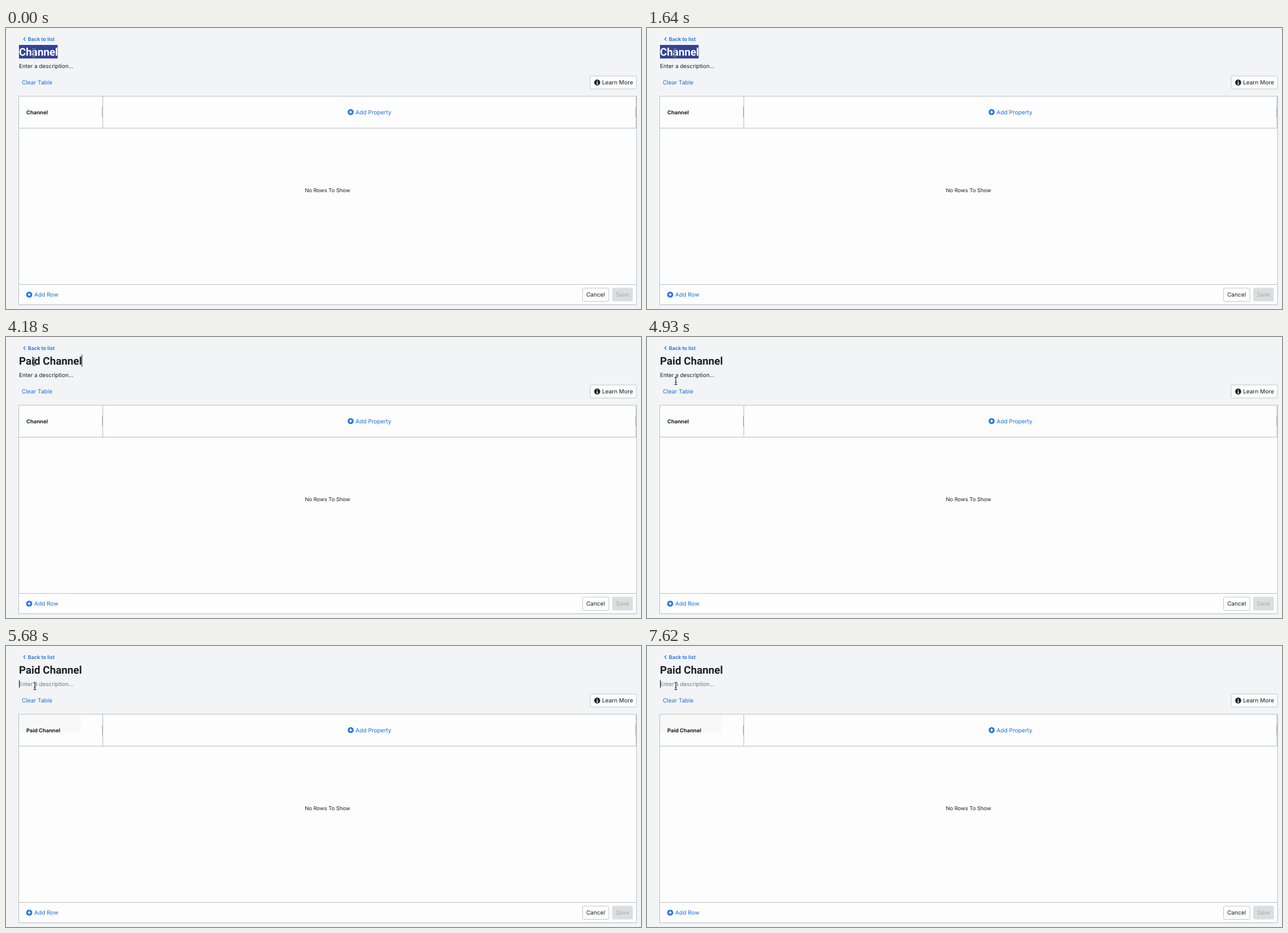
Write an HTML page that moves like this. It is 1125x498 px and loops after 8000 ms.

```html
<!DOCTYPE html>
<html lang="en">
<head>
<meta charset="utf-8">
<title>Table editor</title>
<style>
  html, body { margin: 0; width: 100%; height: 100%; overflow: hidden; background: #f3f4f6; }
  svg { display: block; width: 1125px; height: 498px; }
  text { font: 10.1px Inter, sans-serif; fill: #1d1f22; white-space: pre; text-rendering: geometricPrecision; }
  .link { fill: #1b6fe0; }
  .back { font-size: 9px; font-weight: 600; }
  .head { font-size: 9.4px; font-weight: 700; }
  .empty { font-size: 9.4px; text-anchor: middle; }
  #title { font: 600 18.8px Roboto, sans-serif; }
  .line { fill: none; stroke: #b9bbbf; }
  .button { fill: #fdfdfd; stroke: #c3c5c9; }
</style>
</head>
<body>
<svg viewBox="0 0 1125 498">
  <defs>
    <g id="plus">
      <circle r="5.3" fill="#1b6fe0"/>
      <path d="M-2.9 0H2.9M0-2.9V2.9" stroke="#fff" stroke-width="1.5"/>
    </g>
    <path id="beam" d="M-2.6-6.5Q0-6.5 0-4.8Q0-6.5 2.6-6.5M0-5V5M-2.6 6.5Q0 6.5 0 4.8Q0 6.5 2.6 6.5M-1.5 2H1.5" fill="none"/>
  </defs>

  <path d="M34.4 16.6L31.4 19.6L34.4 22.6" fill="none" stroke="#1b6fe0" stroke-width="1.3"/>
  <text class="link back" x="38.8" y="22.9">Back to list</text>

  <rect id="selection" x="23" y="30" width="68.5" height="24" fill="#32439b"/>
  <text id="title" x="23" y="48.9"></text>
  <rect id="titleCaret" y="31" width="1" height="22" fill="#1d1f22"/>

  <rect id="hover" x="23" y="60" width="1093" height="14" fill="#dcdddf"/>
  <text id="description" x="23" y="70.5" style="font-size:9.9px">Enter a description...</text>
  <rect id="descCaret" x="23" y="60" width="1" height="14" fill="#1d1f22"/>

  <text class="link" x="28" y="100.2">Clear Table</text>
  <rect class="button" x="1035" y="85" width="82" height="23" rx="2"/>
  <circle cx="1047.4" cy="96.5" r="5.3" fill="#1d1f22"/>
  <path d="M1047.4 93V94.4M1046.3 96H1047.6V99.3M1046 99.3H1049" fill="none" stroke="#fff" stroke-width="1.2"/>
  <text x="1056" y="100.2">Learn More</text>

  <rect x="22.5" y="121" width="1094.5" height="369.5" fill="#fdfdfd" class="panel"/>
  <rect id="tint" x="23" y="122" width="110" height="31" fill="#f8f8f8"/>
  <path class="line" d="M22.5 121H1117V490.5H22.5ZM22.5 177.5H1117M22.5 454.5H1117M171.5 121V177.5"/>
  <path class="line" d="M170.7 140V158M1116.4 121V177.5" style="stroke:#a3a6ab"/>
  <path class="line" d="M1115.8 140V158" style="stroke:#a3a6ab"/>
  <text id="heading" class="head" x="36" y="152.6"></text>
  <use href="#plus" x="610.6" y="149"/>
  <text class="link" x="619.3" y="152.7">Add Property</text>
  <text class="empty" x="569.5" y="291.1">No Rows To Show</text>

  <use href="#plus" x="41.1" y="472.5"/>
  <text class="link" x="50" y="476.3">Add Row</text>
  <rect class="button" x="1021.5" y="461" width="46.5" height="23.5" rx="2"/>
  <text x="1028" y="476.3">Cancel</text>
  <rect x="1074" y="460.5" width="36.5" height="24" rx="2" fill="#dcdddf"/>
  <text x="1080.6" y="476.3" style="fill:#a9abaf">Save</text>

  <g id="cursor">
    <use href="#beam" stroke="#f3f4f6" stroke-width="2.4" stroke-opacity=".75"/>
    <use href="#beam" stroke="#1d1f22" stroke-width="1.1"/>
  </g>
</svg>

<script>
const LOOP = 8000;
const byId = id => document.getElementById(id);
const show = (id, on) => byId(id).setAttribute('visibility', on ? 'visible' : 'hidden');

// Each step changes only the listed properties of the state before it.
const steps = [
  [0, { title: 'Channel', heading: 'Channel', selected: true, titleCaret: false,
        hover: false, focused: false, descCaret: false, cursor: [49.5, 44] }],
  [2090, { title: 'P', selected: false, titleCaret: true }],
  [2390, { title: 'Pa' }],
  [2540, { title: 'Pai' }],
  [2690, { title: 'Paid' }],
  [3140, { title: 'Paid ' }],
  [3440, { title: 'Paid C' }],
  [3590, { title: 'Paid Ch' }],
  [3740, { title: 'Paid Cha' }],
  [3890, { title: 'Paid Chan' }],
  [4030, { title: 'Paid Channe' }],
  [4180, { title: 'Paid Channel' }],
  [4480, { cursor: [50, 50] }],
  [4630, { cursor: [51, 66], hover: true, titleCaret: false }],
  [4780, { cursor: [51, 88], hover: false }],
  [4930, { cursor: [51, 78] }],
  [5080, { cursor: [51, 71], hover: true, titleCaret: true }],
  [5530, { heading: 'Paid Channel', titleCaret: false }],
  [5680, { hover: false, focused: true, descCaret: true }],
  [6120, { descCaret: false }],
  [6570, { descCaret: true }],
  [7170, { descCaret: false }],
  [7620, { descCaret: true }]
];

let state = {};
const timeline = steps.map(([time, change]) => ({ time, state: state = { ...state, ...change } }));

function draw(s) {
  const title = byId('title');
  title.textContent = s.title;
  title.style.fill = s.selected ? '#fff' : '#1d1f22';
  byId('titleCaret').setAttribute('x', Math.round(23 + title.getComputedTextLength()));
  byId('heading').textContent = s.heading;
  byId('description').style.fill = s.focused ? '#74777c' : '#1d1f22';
  byId('cursor').setAttribute('transform', `translate(${s.cursor})`);
  show('selection', s.selected);
  show('titleCaret', s.titleCaret);
  show('hover', s.hover);
  show('descCaret', s.descCaret);
  show('tint', s.heading !== 'Channel');
}

const start = performance.now();
let current;
function tick() {
  const time = (performance.now() - start) % LOOP;
  const step = timeline.findLast(entry => entry.time <= time);
  if (step !== current) draw((current = step).state);
  requestAnimationFrame(tick);
}
tick();
</script>
</body>
</html>
```
